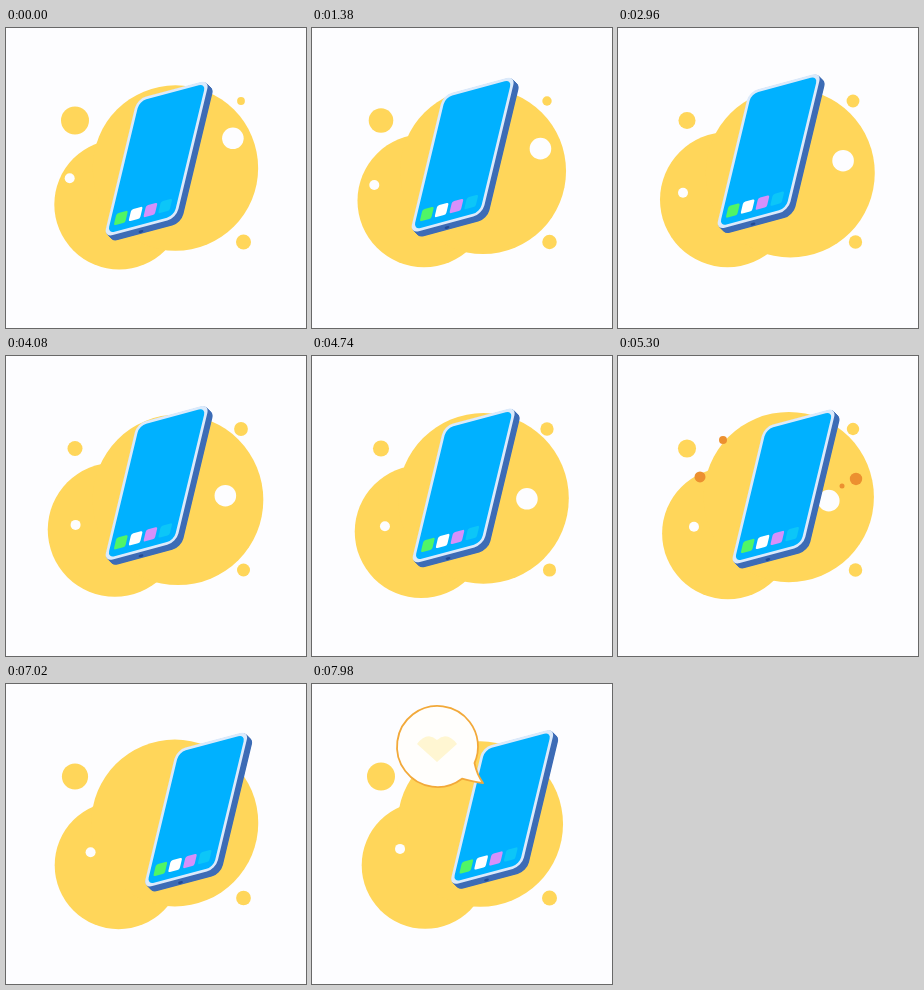
Recreate the animation shown at these times as an HTML page with a canvas. Size 300x300 px, loop 8 s.

```html
<!DOCTYPE html>
<html lang="en">
<head>
<meta charset="utf-8">
<title>Phone message</title>
<style>
  html, body { margin: 0; width: 100%; height: 100%; overflow: hidden; background: #fdfdff; }
  canvas { display: block; width: 100vw; height: 100vh; }
</style>
</head>
<body>
<canvas id="stage" width="300" height="300"></canvas>
<script>
const ctx = document.getElementById('stage').getContext('2d');
const LOOP = 8000;
const PAPER = '#fdfdff', YELLOW = '#ffd65a', ORANGE = '#ec9030';

const progress = (t, from, to) => Math.min(1, Math.max(0, (t - from) / (to - from)));
const ease = p => (1 - Math.cos(Math.PI * p)) / 2;
const easeOutBack = p => 1 + 2.7 * (p - 1) ** 3 + 1.7 * (p - 1) ** 2;
// Cosine that peaks at the given time
const wave = (t, peak, period) => Math.cos(2 * Math.PI * (t - peak) / period);

function circle(x, y, r, color) {
  ctx.beginPath();
  ctx.arc(x, y, Math.max(0, r), 0, 2 * Math.PI);
  ctx.fillStyle = color;
  ctx.fill();
}

function polygon(points, color) {
  ctx.beginPath();
  points.forEach(([x, y]) => ctx.lineTo(x, y));
  ctx.closePath();
  ctx.fillStyle = color;
  ctx.fill();
}

function roundRect(x, y, w, h, r, color) {
  ctx.beginPath();
  ctx.roundRect(x, y, w, h, r);
  ctx.fillStyle = color;
  ctx.fill();
}

// A hole circling a centre on a slightly bulging orbit
function orbitingHole(x, y, orbit, degrees, size) {
  const angle = degrees * Math.PI / 180;
  circle(x + orbit * Math.cos(angle), y + orbit * Math.sin(angle), size, PAPER);
}

function drawBackdrop(t) {
  circle(111 + 2.2 * wave(t, 0, LOOP), 176.5 - 5 * wave(t, 2500, 10000), 65.5 + 2 * wave(t, 3000, 10000), YELLOW);
  circle(170.3 + 2 * wave(t, 3200, 10000), 142 + 3 * wave(t, 2900, LOOP), 84 + 1.4 * wave(t, 4500, LOOP), YELLOW);
  const pulse = wave(t, 0, LOOP);
  circle(69, 92.5, 10.75 + 3.25 * pulse, YELLOW);
  circle(235, 73, 5.4 - 1.5 * pulse, YELLOW);
  circle(237.5, 214, 7 + 0.5 * pulse, YELLOW);
  const bulge = Math.sin(Math.PI * t / LOOP);
  orbitingHole(196, 113, 31 + 4.5 * bulge, -5 + 0.0132 * t, 10.8);
  orbitingHole(78, 154, 14.8 + 2.3 * bulge, 195 - 0.0185 * t, 5);
}

const SPARKS = [
  { from: [105, 84], to: [127, 47], r: 4 },
  { from: [82, 121], to: [78, 67], r: 5.5 },
  { from: [238, 123], to: [245, 73], r: 6.2 },
  { from: [224, 130], to: [230, 85], r: 2.5 }];

function drawSparks(t) {
  const size = ease(progress(t, 4950, 5250)) * (1 - ease(progress(t, 6180, 6750)));
  const p = (t - 5300) / 880;
  for (const { from, to, r } of SPARKS) {
    circle(from[0] + (to[0] - from[0]) * p, from[1] + (to[1] - from[1]) * p, r * size, ORANGE);
  }
}

const ICONS = ['#50f566', '#ffffff', '#d690fa', '#0cc6f8'];

function drawPhone(x, y) {
  ctx.save();
  ctx.translate(x, y);
  const onFace = (shift, paint) => {
    ctx.save();
    ctx.transform(1, -0.268, -0.24, 1, 131 + shift, 71 + shift);
    paint();
    ctx.restore();
  };
  for (let depth = 5; depth > 0; depth -= 0.5) {
    onFace(depth, () => roundRect(0, 0, 72.5, 138.5, 9, '#3d6cb6'));
  }
  onFace(0, () => {
    roundRect(0, 0, 72.5, 138.5, 9, '#dbeafb');
    roundRect(3, 3, 66.5, 132.5, 7, '#00b1ff');
    ICONS.forEach((color, i) => roundRect(7.5 + 14.8 * i, 116.5, 11.5, 12, 2, color));
  });
  ctx.beginPath();
  ctx.ellipse(135, 203.5, 2.5, 1.3, -0.26, 0, 2 * Math.PI);
  ctx.fillStyle = '#234a94';
  ctx.fill();
  ctx.restore();
}

function drawSlot(t, x, y) {
  const open = ease(progress(t, 5450, 5700)) * (1 - ease(progress(t, 6250, 6450)));
  if (!open) return;
  ctx.save();
  ctx.translate(151.2 + x, 123 + y);
  ctx.beginPath();
  ctx.moveTo(8.5 * open, -32 * open);
  ctx.lineTo(-8.5 * open, 34 * open);
  ctx.lineWidth = 9 * open;
  ctx.lineCap = 'round';
  ctx.strokeStyle = '#0789b5';
  ctx.stroke();
  ctx.restore();
}

function drawEnvelope(t, x, y) {
  if (t < 5650 || t > 6580) return;
  const inside = 1 - ease(progress(t, 5650, 6180));
  const leaving = progress(t, 6180, 6580);
  ctx.save();
  if (!leaving) {
    // Only the part left of the slot is visible
    ctx.beginPath();
    [[0, 0], [182 + x, 0], [110 + x, 300], [0, 300]].forEach(([px, py]) => ctx.lineTo(px, py + y));
    ctx.clip();
  }
  ctx.translate(138 + 100 * inside - 127 * leaving, 111.5 + 27 * inside - 30 * leaving);
  ctx.rotate(0.26);
  ctx.scale(1 - leaving, 1 - leaving);
  const w = 47, h = 27.5;
  polygon([[-w, -h], [w, -h], [w, h], [-w, h]], '#fca626');
  polygon([[-w, h], [0, -3], [w, h]], '#ffcc14');
  polygon([[-w, -h], [w, -h], [0, 5]], '#f0902a');
  ctx.strokeStyle = '#ffcf57';
  ctx.lineWidth = 1.5;
  ctx.lineJoin = 'round';
  ctx.beginPath();
  ctx.moveTo(-w, h);
  ctx.lineTo(-7, 1);
  ctx.moveTo(w, h);
  ctx.lineTo(7, 1);
  ctx.moveTo(-w, -h);
  ctx.lineTo(0, 5);
  ctx.lineTo(w, -h);
  ctx.rect(-w, -h, 2 * w, 2 * h);
  ctx.stroke();
  ctx.restore();
}

function drawBubble(t) {
  if (t < 7050) return;
  const size = easeOutBack(progress(t, 7050, 7900));
  ctx.save();
  ctx.translate(171, 99);
  ctx.scale(size, size);
  ctx.beginPath();
  ctx.arc(-45.5, -36.5, 40.5, 0.92, 0.42 + 2 * Math.PI);
  ctx.quadraticCurveTo(-6, -8, 0, 0);
  ctx.quadraticCurveTo(-9, -1, -21, -4.3);
  ctx.closePath();
  ctx.fillStyle = '#fffefc';
  ctx.fill();
  ctx.strokeStyle = '#f2a93a';
  ctx.lineWidth = 1.8;
  ctx.lineJoin = 'round';
  ctx.stroke();
  // Faint symbol fading in
  ctx.globalAlpha = 0.22 * progress(t, 7780, 7980);
  ctx.translate(-46, -36);
  ctx.beginPath();
  ctx.moveTo(0, 15);
  ctx.lineTo(-20, -3);
  ctx.quadraticCurveTo(-10, -16, 0, -7);
  ctx.quadraticCurveTo(10, -16, 20, -3);
  ctx.closePath();
  ctx.fillStyle = '#ffd83c';
  ctx.fill();
  ctx.restore();
}

function draw(t) {
  ctx.fillStyle = PAPER;
  ctx.fillRect(0, 0, 300, 300);
  const phoneX = 39.5 * ease(progress(t, 4560, 6320));
  const phoneY = 3.8 * (wave(t, 0, 5400) - 1);
  drawBackdrop(t);
  drawSparks(t);
  drawPhone(phoneX, phoneY);
  drawSlot(t, phoneX, phoneY);
  drawEnvelope(t, phoneX, phoneY);
  drawBubble(t);
}

const start = performance.now();
function tick() {
  draw((performance.now() - start) % LOOP);
  requestAnimationFrame(tick);
}
tick();
</script>
</body>
</html>
```
